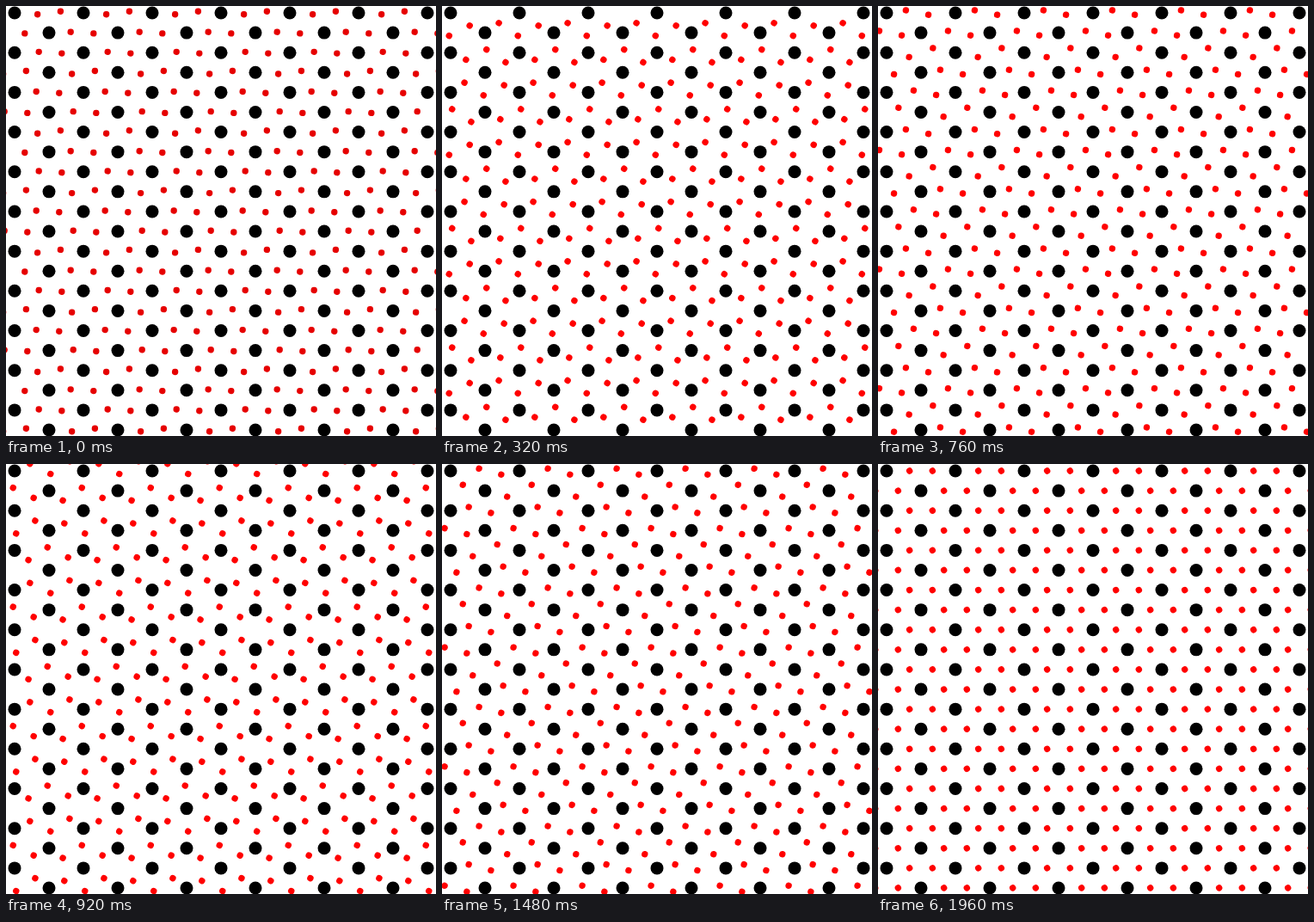
An HTML page that plays this animation: 500x500 px, repeating every 2.04 s.

```html
<!DOCTYPE html>
<html lang="en">
<head>
<meta charset="utf-8">
<title>Turning hexagons</title>
<style>
  @property --turn { syntax: "<angle>"; inherits: true; initial-value: 0deg; }
  @property --drop { syntax: "<length>"; inherits: true; initial-value: 0px; }

  html, body { margin: 0; width: 100%; height: 100%; overflow: hidden; background: #fff; }
  svg { display: block; width: 100%; height: 100%; }

  /* Each 680 ms turn has 17 poses, both ends included; then the pivots move on. */
  #rings {
    fill: #f00;
    transform: translateY(var(--drop));
    animation:
      turn 680ms steps(17, jump-none) -40ms infinite,
      drop 2040ms steps(3, jump-end) -40ms infinite,
      tint 2040ms step-end infinite;
  }
  .ring { transform: rotate(var(--turn)); }

  @keyframes turn { from { --turn: 0deg; } to { --turn: 60deg; } }
  @keyframes drop { from { --drop: 0px; } to { --drop: 138.564px; } }
  @keyframes tint { 0% { fill: #e60000; } 1.9608%, 100% { fill: #f00; } }
</style>
</head>
<body>
<svg viewBox="0 0 500 500">
  <g id="rings"></g>
  <g id="dots"></g>
</svg>
<script>
  const NS = "http://www.w3.org/2000/svg";
  const LEFT = 10, TOP = 8, PITCH = 80;
  const ROW = 40 / Math.sqrt(3);   // between rows of black dots
  const RADIUS = PITCH / 3;        // of a ring of red dots

  function add(parent, tag, attrs) {
    const el = document.createElementNS(NS, tag);
    for (const key in attrs) el.setAttribute(key, attrs[key]);
    return parent.appendChild(el);
  }

  // Visits a staggered grid: every odd row is shifted by half a pitch.
  function grid(first, last, rowHeight, visit) {
    for (let row = first; row <= last; row++) {
      for (let col = -1; col <= 6; col++) {
        visit(LEFT + PITCH * (col + (row & 1) / 2), TOP + rowHeight * row);
      }
    }
  }

  const dots = document.getElementById("dots");
  grid(0, 21, ROW, (x, y) => add(dots, "circle", { cx: x, cy: y, r: 7.5 }));

  const rings = document.getElementById("rings");
  grid(-3, 8, ROW * 3, (x, y) => {
    const place = add(rings, "g", { transform: `translate(${x} ${y})` });
    const ring = add(place, "g", { class: "ring" });
    for (let i = 0; i < 6; i++) {
      const a = i * Math.PI / 3;
      add(ring, "circle", { cx: RADIUS * Math.cos(a), cy: RADIUS * Math.sin(a), r: 3.7 });
    }
  });
</script>
</body>
</html>
```
